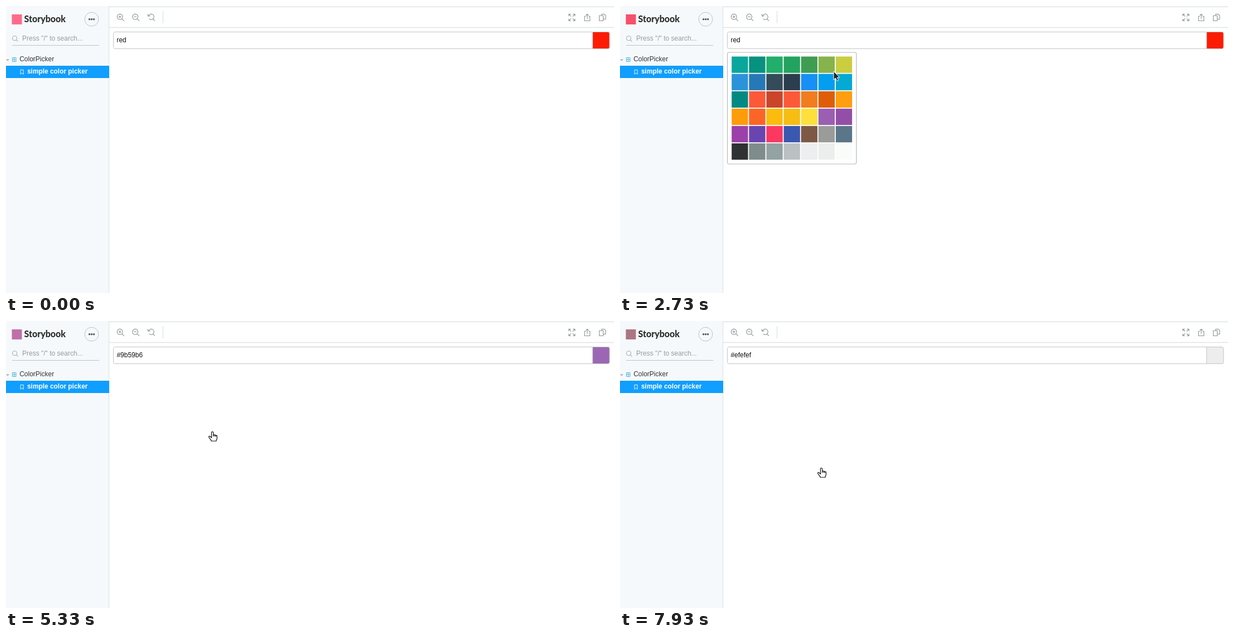
Animation, 1090 px wide and 514 px high, one loop 8000 ms. Source, as an HTML page:

```html
<!DOCTYPE html>
<html lang="en">
<head>
<meta charset="utf-8">
<title>Color picker</title>
<style>
  html, body { margin: 0; width: 100%; height: 100%; overflow: hidden; background: #fff; }
  svg { display: block; width: 100%; height: 100%; }
  text { font: 12px "Liberation Sans", Arial, sans-serif; white-space: pre; }
  .icon { fill: none; stroke: #8d9396; stroke-width: 1.1; }
</style>
</head>
<body>
<svg viewBox="0 0 1090 514" xmlns="http://www.w3.org/2000/svg">
  <rect width="1090" height="514" fill="#f5f9fb"/>
  <rect x="184.5" y="1.5" width="910" height="520" fill="#fefffe" stroke="#e4e9eb" stroke-width="1.6"/>

  <rect id="logo" x="10.5" y="15" width="18" height="18"/>
  <text x="32.5" y="29.3" fill="#2b2b2b" style="font:800 16px Lato,sans-serif">Storybook</text>
  <circle cx="153.5" cy="23.7" r="12.4" fill="none" stroke="#b8c2c6"/>
  <g fill="#615d60">
    <circle cx="149.6" cy="23.7" r="1.8"/><circle cx="153.6" cy="23.7" r="1.8"/><circle cx="157.6" cy="23.7" r="1.8"/>
  </g>
  <g class="icon" style="stroke:#a3acb0">
    <circle cx="15.6" cy="57.8" r="4"/><path d="M18.5 60.7l3 3"/>
  </g>
  <text x="29" y="61.8" fill="#959b9e">Press "/" to search...</text>
  <path d="M11 70.5H167" stroke="#bac3c7"/>
  <path d="M0 95.3h6l-3 3.4z" fill="#a9b4b8"/>
  <path d="M11.5 92.5h6.5v7h-6.5zM14.75 92.5v7M11.5 96h6.5" fill="none" stroke="#4fb5dc"/>
  <text x="24.2" y="99.2" fill="#333">ColorPicker</text>
  <rect y="107" width="185" height="22" fill="#109eff"/>
  <path d="M26 114.3h5.2v8l-2.6-2.3-2.6 2.3z" fill="none" stroke="#e4f4ff"/>
  <text x="38" y="121.2" fill="#fff" style="font-weight:700;font-size:11.9px">simple color picker</text>

  <path d="M185 38.5H1090" stroke="#e1e4e4" stroke-width="1.5"/>
  <path d="M281.5 9V31" stroke="#d8dcdc"/>
  <g class="icon">
    <g id="zoom"><circle cx="204.2" cy="19.3" r="4.9"/><path d="M207.7 22.8l4 4M201.6 19.3h5.2"/></g>
    <path d="M204.2 16.7v5.2"/>
    <use href="#zoom" x="27.4"/>
    <path d="M255.6 17.5a5 5 0 1 1 1 5.4M263.2 22.8l3.7 3.8M254 14.4l.9 3.9 3.9-.8"/>
    <path d="M1009 18.2v-3.7h3.7M1016.3 14.5h3.7v3.7M1020 22.8v3.7h-3.7M1012.7 26.5h-3.7v-3.7M1009 14.5l4.2 4.2M1020 14.5l-4.2 4.2M1020 26.5l-4.2-4.2M1009 26.5l4.2-4.2"/>
    <path d="M1039.5 18.5h-2.3v8h9.6v-8h-2.3M1042 23v-8.3M1039.4 17.1l2.6-2.6 2.6 2.6"/>
    <path d="M1068 17.3v-2.8h4.5l2.5 2.5v6.5h-4M1063.7 17.3h7v9.2h-7z"/>
  </g>

  <rect x="192.5" y="46.5" width="889.5" height="30" rx="3" fill="#fff"/>
  <path id="swatch" d="M1052 46.5h27a3 3 0 0 1 3 3v24a3 3 0 0 1-3 3h-27z"/>
  <path d="M1051.7 47v29" stroke="#c3c5c3"/>
  <rect x="192.5" y="46.5" width="889.5" height="30" rx="3" fill="none" stroke="#c3c5c3"/>
  <text id="value" x="198.4" y="65.1" fill="#111"></text>

  <g id="panel">
    <rect x="192.5" y="83" width="231.3" height="200" rx="3.5" fill="#fff" stroke="#b6b9b8" stroke-width="1.2"/>
  </g>

  <g id="cursor">
    <path id="arrow" d="M0 0V15.2L3.5 12 6 17.3 8.7 16 6.2 11H10.8Z" fill="#222" stroke="#fff"/>
    <path id="hand" fill="#fff" stroke="#111" stroke-width="1.2" stroke-linejoin="round"
      d="M-1.6 9.5V1.8Q-1.6.3 0 .3T1.6 1.8V6Q3 5 4.3 6.3 5.6 5.6 6.4 6.9 8.4 6.4 8.4 8.6V11.6Q8.4 13.6 7 15.2V17H-2.2V15.6L-6 10.6Q-7 9 -5.7 8.3-4.5 7.8-3.2 9.5L-1.6 11ZM1.6 6V9M4.3 6.3V9M6.4 6.9V9"/>
  </g>
</svg>
<script>
const LOOP = 8000, STEP = 130;
const $ = id => document.getElementById(id);

const palette = [
  '0ba69b 07917f 21af6b 23a35f 3f9d53 86b34c cbcd40',
  '2c93da 2679b6 344b59 2c3d4d 1690f4 039ef0 04a9d4',
  '028a82 fc5939 cb452a fc5939 f17d1e df5d08 fe9e10',
  'fe9c0a fd6527 fbbc0e f6be13 fde03c 9b5fb2 934fa8',
  '9c40aa 6a45b0 fc3860 3a58b0 7d5945 9a9c9a 5b7688',
  '2f3232 7f8c8c 93a2a2 bbc1c3 eceeef eceded fafcfa'
];
palette.forEach((row, r) => row.split(' ').forEach((color, c) => {
  const cell = document.createElementNS('http://www.w3.org/2000/svg', 'rect');
  const attrs = { x: 200.2 + c * 31.1, y: 90.5 + r * 31.1, width: 29.3, height: 29.3, fill: '#' + color };
  for (const k in attrs) cell.setAttribute(k, attrs[k]);
  $('panel').append(cell);
}));

// start, field text, swatch colour
const picks = [
  [0, 'red', '#fc1c03'], [3120, '#8bc34a', '#86b24a'],
  [5200, '#9b59b6', '#9b67b4'], [7800, '#efefef', '#ecedec']
];
const tints = [
  [0, '#ff6a8c'], [130, '#f7506c'], [3250, '#b98483'],
  [5200, '#c070a8'], [6110, '#bb7397'], [7800, '#ab7683']
];
const opened = [[1300, 3120], [4420, 5200], [6890, 7800]];

// time, x, y, hand pointer
const path = [
  [130, 1086, 446, 0], [910, 1050, 150, 0], [1170, 1070, 64, 0], [1820, 1070, 64, 0],
  [2210, 600, 130, 0], [2340, 600, 130, 0], [2730, 383, 117, 0], [2990, 372, 112, 1],
  [3250, 372, 112, 1], [3380, 400, 112, 0], [4290, 1061, 65, 0], [4550, 1061, 65, 0],
  [5070, 370, 198, 1], [5460, 370, 198, 0], [6110, 1040, 95, 0], [6370, 1076, 69, 0],
  [7020, 1076, 69, 0], [7670, 361, 263, 1], [LOOP, 361, 263, 1]
];

const latest = (list, t) => list.filter(item => item[0] <= t).pop();
const show = (id, on) => $(id).setAttribute('visibility', on ? 'visible' : 'hidden');

function pointer(t) {
  const i = path.indexOf(latest(path, t));
  const [t0, x0, y0, hand] = path[i], [t1, x1, y1] = path[i + 1];
  const u = (t - t0) / (t1 - t0), e = u * u * (3 - 2 * u);
  const x = x0 + (x1 - x0) * e, y = y0 + (y1 - y0) * e;
  return { x, y, hand: hand || (x > 1051 && y > 46 && y < 77) };
}

function draw(time) {
  const t = Math.floor((time % LOOP) / STEP) * STEP;
  const [, text, color] = latest(picks, t);
  $('value').textContent = text;
  $('swatch').setAttribute('fill', color);
  $('logo').setAttribute('fill', latest(tints, t)[1]);
  show('panel', opened.some(([a, b]) => t >= a && t < b));

  const moving = t >= path[0][0];
  const p = moving ? pointer(t) : { x: 0, y: 0 };
  $('cursor').setAttribute('transform', `translate(${p.x} ${p.y})`);
  show('hand', moving && p.hand);
  show('arrow', moving && !p.hand);
}

const start = performance.now();
function tick() {
  draw(performance.now() - start);
  requestAnimationFrame(tick);
}
tick();
</script>
</body>
</html>
```
